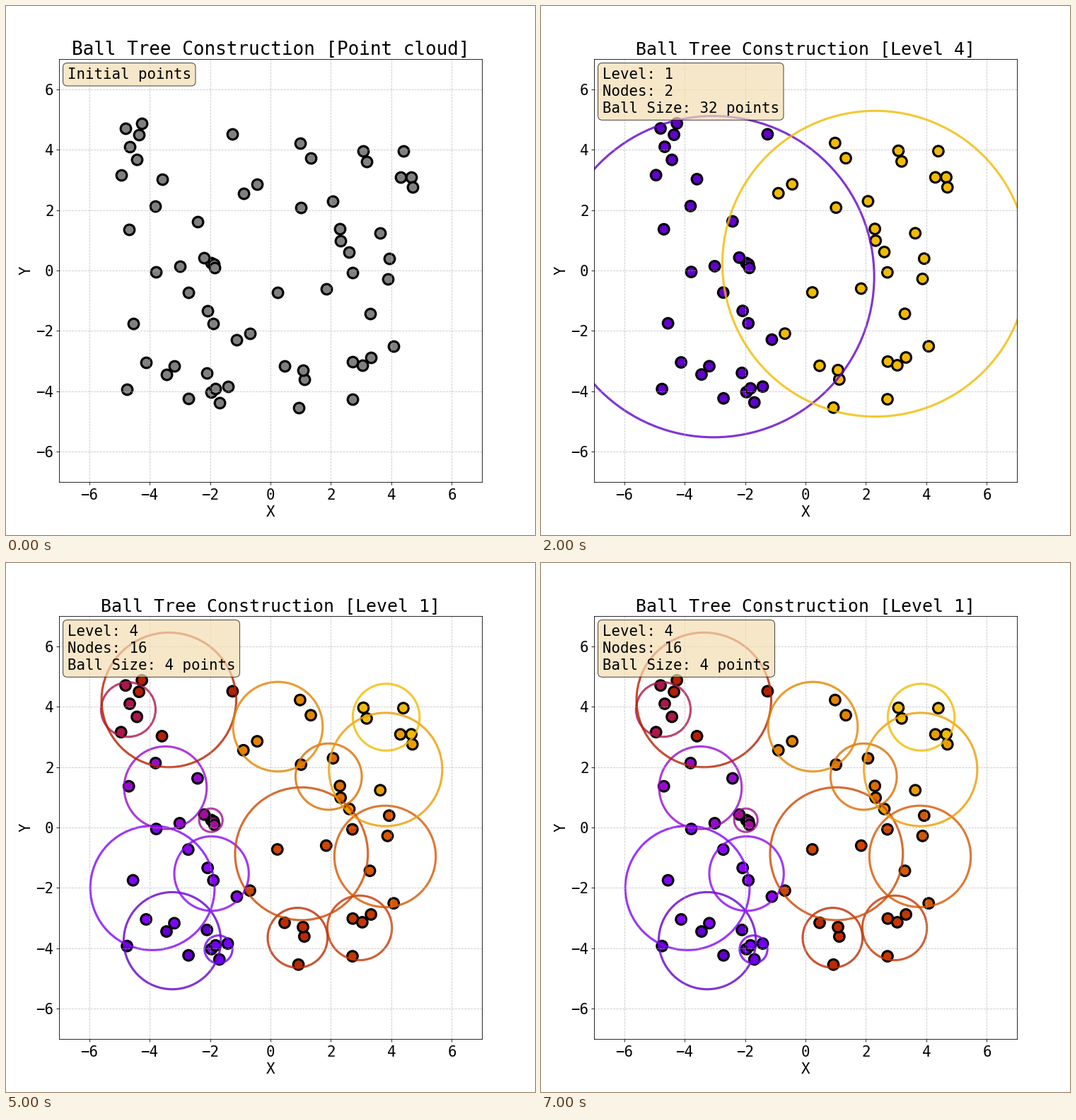
A matplotlib script for the animation above (8 s loop, 748 by 748 pixels).

```python
import numpy as np
import matplotlib.pyplot as plt
from matplotlib.animation import FuncAnimation
from matplotlib.patches import Circle

DEPTH = 5
STEPS = [None, 0, 1, 2, 3, 4, 5, 4]  # tree level per step, None = raw points

np.random.seed(42)
POINTS = np.random.rand(64, 2) * 10 - 5


def split(node):
    """Halve a node's point indices at the median of its widest axis."""
    axis = np.argmax(np.ptp(POINTS[node], axis=0))
    return np.split(node[np.argsort(POINTS[node, axis])], 2)


def build_levels():
    levels = [[np.arange(len(POINTS))]]
    for _ in range(DEPTH):
        levels.append([half for node in levels[-1] for half in split(node)])
    return levels


def level_colors(count):
    values = [0.7] if count == 1 else np.linspace(0.15, 0.9, count)
    return plt.cm.gnuplot(values)


plt.rcParams["font.family"] = "DejaVu Sans Mono"
plt.rcParams["font.size"] = 20

fig = plt.figure(figsize=(10, 10), dpi=74.8, facecolor="white")
ax = fig.add_axes([0.1, 0.1, 0.8, 0.8])
ax.set(xlim=(-7, 7), ylim=(-7, 7), xlabel="X", ylabel="Y",
       xticks=range(-6, 7, 2), yticks=range(-6, 7, 2))
ax.tick_params(axis="x", pad=4.5)
ax.grid(True, linestyle="--", alpha=0.7)
info = ax.text(0.02, 0.98, "", transform=ax.transAxes, va="top",
               linespacing=1.26,
               bbox=dict(boxstyle="round,pad=0.3", facecolor="wheat",
                         alpha=0.7))

LEVELS = build_levels()
drawn = []


def set_title(tag, size):
    ax.set_title(f"Ball Tree Construction [{tag}]", fontsize=size)


def add_points(colors):
    drawn.append(ax.scatter(*POINTS.T, s=200, c=colors,
                            edgecolors="black", linewidths=3))


def add_ball(points, color):
    center = points.mean(axis=0)
    radius = np.linalg.norm(points - center, axis=1).max() + 0.1
    drawn.append(ax.add_patch(Circle(center, radius, fill=False, alpha=0.8,
                                     edgecolor=color, linewidth=3)))


def draw_level(level):
    nodes = LEVELS[level]
    set_title(f"Level {DEPTH - level}", 24)
    info.set_text(f"Level: {level}\nNodes: {len(nodes)}\n"
                  f"Ball Size: {len(nodes[0])} points")
    ball_colors = level_colors(len(nodes))
    point_colors = np.empty((len(POINTS), 4))
    for node, color in zip(nodes, ball_colors):
        point_colors[node] = color
    add_points(point_colors)
    for node, color in zip(nodes, ball_colors):
        add_ball(POINTS[node], color)


def update(step):
    while drawn:
        drawn.pop().remove()
    if STEPS[step] is None:
        set_title("Point cloud", 25)
        info.set_text("Initial points")
        add_points("gray")
    else:
        draw_level(STEPS[step])
    return drawn


anim = FuncAnimation(fig, update, frames=len(STEPS), interval=1000,
                     init_func=lambda: drawn, repeat=True, repeat_delay=0)
plt.show()
```
